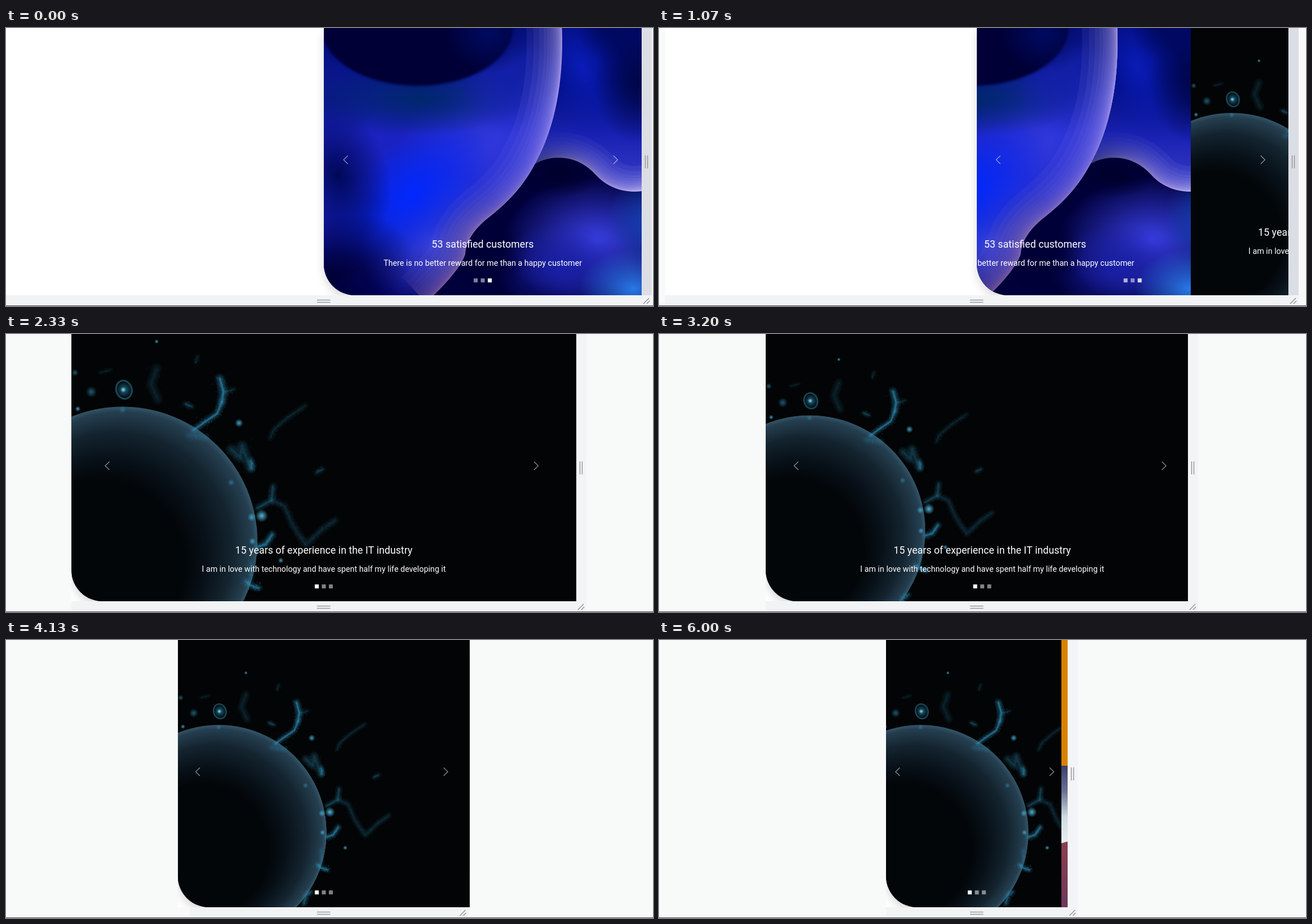
An HTML page with a canvas for the animation above (6.07 s loop, 1140 px wide and 491 px high).

```html
<!DOCTYPE html>
<html lang="en">
<head>
<meta charset="utf-8">
<title>Responsive carousel</title>
<style>
  html, body { margin: 0; width: 100%; height: 100%; overflow: hidden; background: #f8f9f9; }
  canvas { display: block; }
</style>
</head>
<body>
<canvas id="stage" width="1140" height="491"></canvas>
<script>
const LOOP = 6070, MID = 560, H = 472, IMG_W = 711;
const ctx = document.getElementById('stage').getContext('2d');

// Keyframes as [ms, value]: device edge, painted page edge, layout lag
const EDGE = [[600, 1120], [1070, 1109], [1200, 1104], [1670, 1061], [1870, 1047], [2330, 1005],
  [2530, 991], [3200, 932], [3870, 834], [4130, 797], [4530, 740], [4930, 720]];
const PAGE_LAG = [[3870, 0], [4130, 21], [4400, 0]];
const LAYOUT_LAG = [[3000, 0], [3200, 19], [3400, 0]];

const SLIDES = [
  { title: '15 years of experience in the IT industry',
    text: 'I am in love with technology and have spent half my life developing it' },
  { title: '', text: '' },
  { title: '53 satisfied customers',
    text: 'There is no better reward for me than a happy customer' }
];
const TURNS = [{ at: 942, from: 2, to: 0 }, { at: 5969, from: 0, to: 1 }];

function lerpKeys(keys, t) {
  if (t <= keys[0][0]) return keys[0][1];
  for (let i = 1; i < keys.length; i++) {
    const [t0, a] = keys[i - 1], [t1, b] = keys[i];
    if (t <= t1) return a + (b - a) * (t - t0) / (t1 - t0);
  }
  return keys[keys.length - 1][1];
}

// CSS "ease": cubic-bezier(.25, .1, .25, 1)
function ease(x) {
  if (x <= 0) return 0;
  if (x >= 1) return 1;
  let lo = 0, hi = 1;
  for (let i = 0; i < 24; i++) {
    const s = (lo + hi) / 2, r = 1 - s;
    if (.75 * r * r * s + .75 * r * s * s + s * s * s < x) lo = s; else hi = s;
  }
  const r = 1 - lo;
  return .3 * r * r * lo + 3 * r * lo * lo + lo * lo * lo;
}

function picture(paint) {
  const c = document.createElement('canvas');
  c.width = IMG_W * 2;
  c.height = H * 2;
  const g = c.getContext('2d');
  g.scale(2, 2);
  paint(g);
  return c;
}

function glow(g, x, y, rx, ry, color, turn = 0) {
  g.save();
  g.translate(x, y);
  g.rotate(turn);
  g.scale(rx, ry);
  const grad = g.createRadialGradient(0, 0, 0, 0, 0, 1);
  grad.addColorStop(0, color);
  grad.addColorStop(.5, color + '80');
  grad.addColorStop(1, color + '00');
  g.fillStyle = grad;
  g.fillRect(-1, -1, 2, 2);
  g.restore();
}

function linear(g, x0, y0, x1, y1, ...colors) {
  const grad = g.createLinearGradient(x0, y0, x1, y1);
  colors.forEach((c, i) => grad.addColorStop(i / (colors.length - 1), c));
  return grad;
}

// Soft light that builds up towards an edge
function rim(g, edge, style, width, alpha) {
  g.save();
  g.strokeStyle = style;
  g.globalAlpha = alpha;
  for (let w = width; w > 1; w *= .8) {
    g.lineWidth = w;
    g.stroke(edge);
  }
  g.restore();
}

function paintBlue(g) {
  // lower area
  g.fillStyle = '#00003a';
  g.fillRect(0, 0, IMG_W, H);
  glow(g, 480, 375, 165, 115, '#3a40e6');
  glow(g, 420, 425, 120, 80, '#1a20a8');
  glow(g, 545, 460, 95, 70, '#2a78e8');
  glow(g, 570, 340, 70, 80, '#1440b0');
  glow(g, 290, 400, 70, 70, '#000038');
  glow(g, 415, 258, 75, 42, '#00002c');

  // upper right sheet
  const wave = 'M372 240C385 232 400 229 413 229C440 229 462 240 480 260C500 282 530 292 560 288L720 262';
  g.save();
  g.clip(new Path2D(wave + 'L720 -10H400Z'));
  g.fillStyle = linear(g, 0, 0, 0, 290, '#00096a', '#000d78', '#1a22b4', '#3a40c8');
  g.fillRect(0, 0, IMG_W, H);
  glow(g, 455, 70, 75, 130, '#0a1cb8', -.4);
  glow(g, 555, 95, 80, 110, '#000648');
  glow(g, 505, 0, 60, 60, '#000a60');
  rim(g, new Path2D(wave), linear(g, 372, 0, 560, 0, '#40406c', '#7a70a0', '#b8a4e4', '#e8dcff'), 90, .075);
  g.restore();

  // main body
  const side = 'M419 -10C425 110 400 190 372 240C350 282 322 310 290 335C262 357 250 380 249 400C240 425 212 455 180 485';
  g.save();
  g.clip(new Path2D(side + 'H-10V-10Z'));
  g.fillStyle = linear(g, 0, 0, 0, H, '#000a70', '#0a1690', '#1c22c0', '#1824c8', '#0c1494', '#000058');
  g.fillRect(0, 0, IMG_W, H);
  glow(g, 300, 200, 190, 150, '#3038dc', -.8);
  glow(g, 190, 380, 130, 120, '#3a42d8', -.7);
  glow(g, 155, 295, 165, 95, '#0028ff', -.75);
  glow(g, 25, 260, 90, 130, '#000858', -.3);
  glow(g, 15, 440, 150, 100, '#000038', -.5);
  glow(g, 15, 120, 90, 80, '#0a1888');
  glow(g, 170, 125, 190, 65, '#00286c');
  glow(g, 330, 80, 90, 110, '#1220a8', .3);
  g.filter = 'blur(5px)';
  g.fillStyle = '#000036';
  g.beginPath();
  g.ellipse(165, 0, 168, 102, 0, 0, 7);
  g.fill();
  g.filter = 'none';
  glow(g, 290, 10, 80, 70, '#000a60');
  rim(g, new Path2D(side), linear(g, 0, 0, 0, H, '#cbb8ff', '#c8b4ff', '#9c8ce8', '#a07cb0', '#8a64a0'), 125, .075);
  g.restore();
}

function paintPlanet(g) {
  let seed = 7;
  const rand = () => (seed = seed * 16807 % 2147483647) / 2147483647;
  const spread = () => rand() + rand() + rand() - 1.5;

  g.fillStyle = '#030405';
  g.fillRect(0, 0, IMG_W, H);

  const body = g.createRadialGradient(42, 372, 118, 72, 340, 190);
  body.addColorStop(0, '#030609');
  body.addColorStop(.3, '#081119');
  body.addColorStop(.65, '#14242f');
  body.addColorStop(.93, '#253f50');
  body.addColorStop(1, '#345669');
  g.fillStyle = body;
  g.beginPath();
  g.arc(72, 340, 190, 0, 7);
  g.fill();

  // Dusty filament along x,y pairs
  function wisp(pts, width, alpha, core = alpha) {
    g.strokeStyle = '#2f8fb8';
    g.lineCap = g.lineJoin = 'round';
    g.beginPath();
    for (let i = 0; i < pts.length; i += 2) g.lineTo(pts[i], pts[i + 1]);
    g.filter = 'blur(5px)';
    g.globalAlpha = alpha * .55;
    g.lineWidth = width;
    g.stroke();
    g.filter = 'blur(1.6px)';
    g.globalAlpha = core * .8;
    g.lineWidth = width * .25;
    g.stroke();
    g.filter = 'none';
    g.fillStyle = '#3a9cc4';
    for (let i = 0; i < pts.length - 2; i += 2) {
      for (let n = 0; n < 45; n++) {
        const k = rand();
        g.globalAlpha = alpha * rand() * .6;
        g.fillRect(pts[i] + (pts[i + 2] - pts[i]) * k + spread() * width,
          pts[i + 1] + (pts[i + 3] - pts[i + 1]) * k + spread() * width, 1, 1);
      }
    }
    g.globalAlpha = 1;
  }
  const spot = (x, y, r, color = '#3f9fc4') => glow(g, x, y, r, r, color);

  wisp([172, 183, 190, 170, 205, 160, 212, 143], 7, .75, 1);
  wisp([212, 143, 214, 128, 209, 110], 10, .75, .8);
  wisp([214, 130, 230, 125], 5, .3);
  wisp([120, 96, 112, 118, 122, 140], 12, .25, .1);
  wisp([40, 102, 55, 98], 5, .2);
  wisp([280, 194, 285, 182, 305, 165, 330, 148], 6, .3, .15);
  wisp([225, 210, 238, 222, 240, 205, 252, 236], 13, .4, .2);
  wisp([253, 226, 254, 238], 7, .7);
  wisp([284, 262, 282, 282, 262, 293], 8, .45, .35);
  wisp([282, 282, 300, 290, 312, 318, 330, 345, 352, 324, 372, 310], 8, .35, .12);
  wisp([262, 348, 274, 344, 283, 330], 8, .8);
  wisp([246, 397, 254, 403, 264, 406], 7, .8);
  wisp([234, 445, 226, 450, 222, 466], 8, .7, .4);
  wisp([252, 370, 254, 395], 5, .4, .2);
  wisp([160, 146, 170, 150], 6, .45);
  wisp([345, 243, 354, 238], 6, .4);
  wisp([178, 78, 175, 88], 5, .25);
  wisp([165, 190, 190, 193], 8, .4, .1);

  // small ring with a bright core
  g.strokeStyle = '#2f86a8';
  g.globalAlpha = .65;
  g.lineWidth = 2;
  g.filter = 'blur(1px)';
  g.beginPath();
  g.ellipse(74, 126, 11, 13, -.3, 0, 7);
  g.stroke();
  g.filter = 'none';
  g.globalAlpha = 1;
  spot(74, 126, 12, '#1d6684');
  spot(73, 126, 4, '#8fdcf4');
  spot(28, 129, 8, '#1d5a74');
  spot(5, 102, 5, '#1d5a74');
  spot(9, 153, 4);
  spot(72, 154, 5, '#2c6f8c');
  spot(120, 58, 3);
  spot(236, 173, 6);
  spot(268, 304, 9, '#4fb4d8');
  spot(254, 306, 6);
  spot(255, 340, 5);
  spot(295, 367, 4);
  spot(225, 257, 5, '#2c6f8c');
}

function paintWarm(g) {
  g.fillStyle = '#d98200';
  g.fillRect(0, 0, IMG_W, H);
  g.fillStyle = linear(g, 0, 222, 0, 358, '#3c3f6c', '#6a7296', '#d0dce2', '#e8f0f0');
  g.fillRect(0, 222, IMG_W, 137);
  g.fillStyle = linear(g, 0, 358, 0, H, '#8a4050', '#6c3a5c');
  g.beginPath();
  g.moveTo(0, 359);
  g.lineTo(IMG_W, 150);
  g.lineTo(IMG_W, H);
  g.lineTo(0, H);
  g.fill();
}

const images = [paintPlanet, paintWarm, paintBlue].map(picture);

function line(...p) {
  ctx.beginPath();
  for (let i = 0; i < p.length; i += 2) ctx.lineTo(p[i], p[i + 1]);
  ctx.stroke();
}

function wrap(text, max) {
  const rows = [''];
  for (const word of text.split(' ')) {
    const last = rows.length - 1, next = rows[last] ? rows[last] + ' ' + word : word;
    if (rows[last] && ctx.measureText(next).width > max) rows.push(word);
    else rows[last] = next;
  }
  return rows;
}

function drawSlide(index, x, w, caption) {
  const k = Math.max(1, w / IMG_W);
  ctx.save();
  ctx.beginPath();
  ctx.rect(x, 0, w, H);
  ctx.clip();
  ctx.drawImage(images[index], x, H / 2 * (1 - k), IMG_W * k, H * k);
  if (caption) {
    const { title, text } = SLIDES[index], cx = x + w / 2;
    ctx.fillStyle = '#fff';
    ctx.textAlign = 'center';
    ctx.font = '14.18px Roboto, sans-serif';
    const rows = wrap(text, w * .7);
    rows.forEach((row, i) => ctx.fillText(row, cx, 420 - 21.3 * (rows.length - 1 - i)));
    ctx.font = '17.72px Roboto, sans-serif';
    ctx.fillText(title, cx, 388 - 21.3 * (rows.length - 1));
  }
  ctx.restore();
}

function drawFrame(edge, t) {
  ctx.fillStyle = '#f1f3f4';
  ctx.fillRect(2 * MID - edge, H, 2 * edge - 2 * MID + 18, 17);
  ctx.fillStyle = t < 1270 ? '#dcdee5' : '#f3f4f6';
  ctx.fillRect(edge, 0, 18, H);
  ctx.fillStyle = '#4a4c50';
  ctx.fillRect(0, 490, 1140, 1);

  ctx.strokeStyle = '#8e9094';
  ctx.lineWidth = 1.3;
  for (const d of [6.5, 10.5]) line(edge + d, 225, edge + d, 248);
  for (const y of [480.5, 484.5]) line(548, y, 571.5, y);
  line(edge + 3, 487, edge + 13, 477);
  line(edge + 9, 487, edge + 14, 482);
}

function corner(x, right) {
  ctx.beginPath();
  ctx.roundRect(x, 0, right - x, H, [0, 0, 0, 55]);
}

function drawPage(right, lag, t) {
  const left = 2 * MID - right, wide = right > 1034;
  const x = wide ? MID : left, w = right + lag - x;

  ctx.save();
  ctx.beginPath();
  ctx.rect(left, 0, right - left, H);
  ctx.clip();
  ctx.fillStyle = '#fff';
  ctx.fillRect(left, 0, right - left, H);

  ctx.save();
  ctx.shadowColor = 'rgba(0,0,0,.15)';
  ctx.shadowBlur = 16;
  ctx.shadowOffsetY = 8;
  ctx.fillStyle = '#000';
  corner(x, right);
  ctx.fill();
  ctx.restore();

  corner(x, right);
  ctx.clip();
  const turn = t < 5900 ? TURNS[0] : TURNS[1];
  const p = ease((t - turn.at) / 600), caption = right - left > 680;
  if (p < 1) drawSlide(turn.from, x - p * w, w, caption);
  if (p > 0) drawSlide(turn.to, x + (1 - p) * w, w, caption);

  // controls
  ctx.strokeStyle = 'rgba(255,255,255,.55)';
  ctx.lineWidth = 1.2;
  const a = x + .075 * w - 3.7, b = x + .925 * w - 3.7;
  line(a + 4, 225.5, a - 3.5, 232.7, a + 4, 240);
  line(b - 4, 225.5, b + 3.5, 232.7, b - 4, 240);
  for (let i = 0; i < 3; i++) {
    const on = i === turn.to ? p : i === turn.from ? 1 - p : 0;
    ctx.fillStyle = `rgba(255,255,255,${.5 + .5 * on})`;
    ctx.fillRect(x + w / 2 + (i - 1) * 12.4 - 3.5, 442.3, 7, 7);
  }
  ctx.restore();
}

function draw(now) {
  const t = Math.floor((now % LOOP + 4) * .015) / .015;
  const edge = lerpKeys(EDGE, t);
  ctx.fillStyle = '#f8f9f9';
  ctx.fillRect(0, 0, 1140, 491);
  drawFrame(edge, t);
  drawPage(edge + lerpKeys(PAGE_LAG, t), lerpKeys(LAYOUT_LAG, t), t);
}

const start = performance.now();
function tick() {
  draw(performance.now() - start);
  requestAnimationFrame(tick);
}
tick();
</script>
</body>
</html>
```
